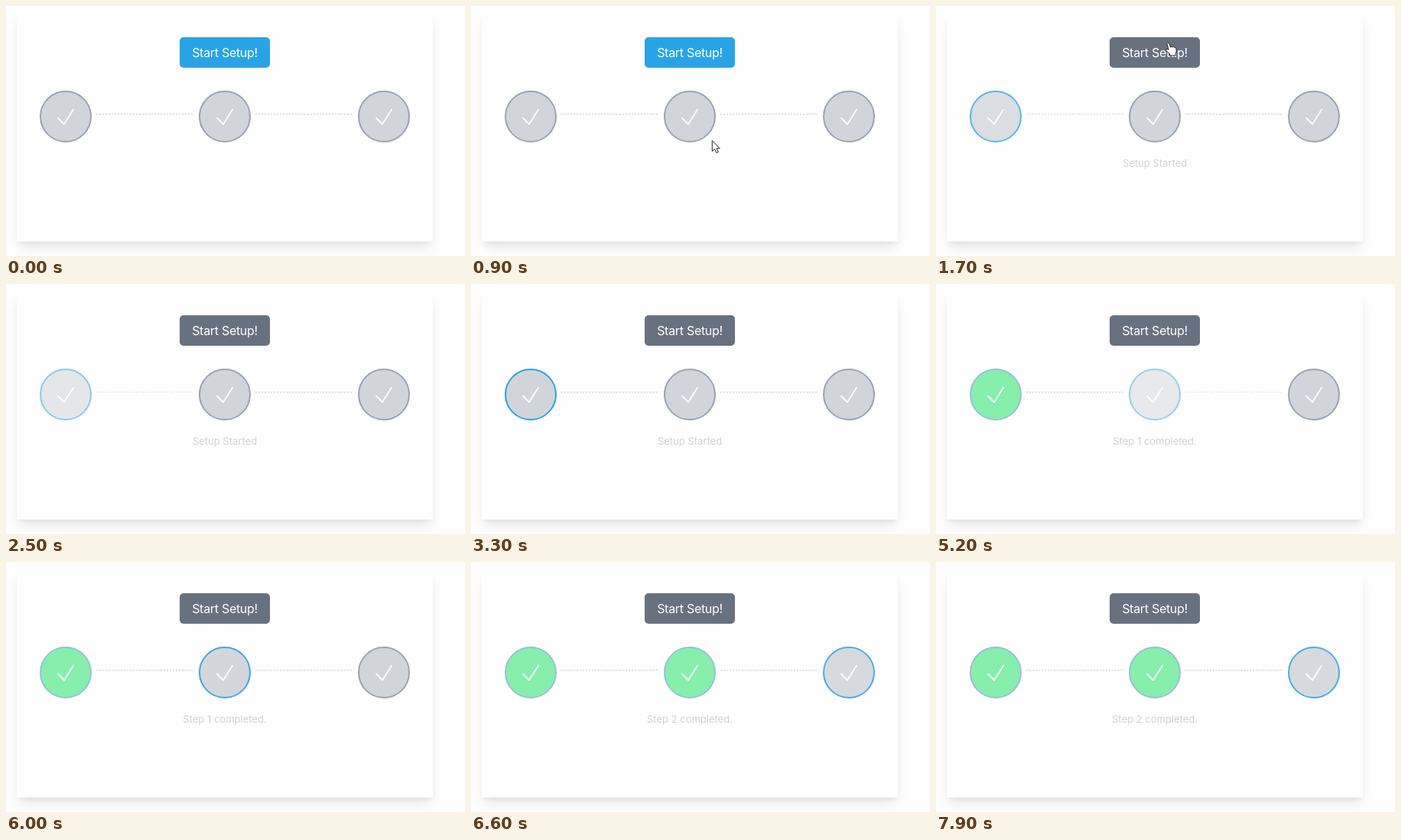
An HTML page for the animation above (8 s loop, 600 by 328 pixels).

```html
<!DOCTYPE html>
<html lang="en">
<head>
<meta charset="utf-8">
<title>Setup steps</title>
<style>
  html, body { margin: 0; width: 100%; height: 100%; overflow: hidden; background: #fefefe; }
  #card {
    position: absolute; left: 14px; top: 11px; width: 544px; height: 298px; background: #fefefe;
    box-shadow: 0 10px 15px -3px rgba(0, 0, 0, .1), 0 4px 6px -2px rgba(0, 0, 0, .05);
  }
  svg { position: absolute; left: 0; top: 0; }
  text { font-family: Inter, "Open Sans", sans-serif; text-anchor: middle; }
  .dots { stroke: #d3d5d9; stroke-width: 2; stroke-dasharray: 0 4; stroke-linecap: round; }
  .check { fill: none; stroke: #fff; stroke-width: 1.8; stroke-linecap: round; stroke-linejoin: round; }
  .pointer path { fill: #fff; stroke: #222; stroke-width: 1; stroke-linejoin: round; }
</style>
</head>
<body>
<div id="card"></div>
<svg width="600" height="328">
  <rect id="button" x="227" y="41" width="118" height="40" rx="5"/>
  <text x="286" y="67" font-size="16" letter-spacing="-.3" fill="#fff">Start Setup!</text>
  <g id="steps"></g>
  <text id="label" x="286" y="211" font-size="13" fill="#cfd2d7"></text>
  <g id="arrow" class="pointer"><path d="M0 0V14L3.3 11L5.6 16L8 15L5.8 10.200H10Z"/></g>
  <g id="hand" class="pointer"><path d="M0 1.500Q1-.8 2.800 1L4.500 6Q6 4.500 7.200 6Q8.600 4.800 9.600 6.300Q11.400 5.600 12 8Q12.800 12 11 14.500V17H4.500Q3.500 14-1.500 10Q-1.500 8 0.500 8.500L2 9.500Z"/></g>
</svg>
<script>
const LOOP = 8000, FRAME = 100;
const STARTS = [1250, 4250, 6250, Infinity];   // when each step becomes active
const LABELS = ['', 'Setup Started', 'Step 1 completed.', 'Step 2 completed.'];
const MOVE = { from: 700, to: 1200, leave: 2250, x0: 322, y0: 242, x1: 302, y1: 48 };
const $ = id => document.getElementById(id);

$('steps').innerHTML = [78, 286, 494].map((x, i) => `<g>
  <circle cx="${x}" cy="145" r="33" stroke-width="2"/>
  <path class="check" d="M${x - 10} 147l8 8l12-19"/>
  ${i < 2 ? `<path class="dots" d="M${x + 41} 142h127"/>` : ''}</g>`).join('');
const steps = [...$('steps').children];

// cubic-bezier(.4, 0, .6, 1)
function ease(x) {
  let u = x;
  for (let i = 0; i < 12; i++) u = (x + .6 * u * u - .4 * u ** 3) / 1.2;
  return u * u * (3 - 2 * u);
}

// Opacity falls from 1 to .5 and back every two seconds
function pulse(age) {
  const phase = age / 1000 % 2;
  return 1 - .5 * ease(phase < 1 ? phase : 2 - phase);
}

function place(el, shown, x, y) {
  el.setAttribute('visibility', shown ? 'visible' : 'hidden');
  el.setAttribute('transform', `translate(${x} ${y})`);
}

function draw(t) {
  steps.forEach((step, i) => {
    const done = t >= STARTS[i + 1], active = t >= STARTS[i] && !done;
    const circle = step.firstElementChild;
    circle.setAttribute('fill', done ? '#86efac' : '#d1d5db');
    circle.setAttribute('stroke', done ? '#98c0d8' : active ? '#2ea3dd' : '#9ca3af');
    step.setAttribute('opacity', active ? pulse(t - STARTS[i]) : 1);
  });
  $('button').setAttribute('fill', t < STARTS[0] ? '#28a4e6' : '#687180');
  $('label').textContent = LABELS[STARTS.filter(s => t >= s).length];

  const p = ease(Math.min(1, Math.max(0, (t - MOVE.from) / (MOVE.to - MOVE.from))));
  const x = MOVE.x0 + (MOVE.x1 - MOVE.x0) * p, y = MOVE.y0 + (MOVE.y1 - MOVE.y0) * p;
  const shown = t >= MOVE.from && t < MOVE.leave, over = y < 81;
  place($('arrow'), shown && !over, x, y);
  place($('hand'), shown && over, x, y);
}

function tick() {
  draw(Math.floor(performance.now() % LOOP / FRAME) * FRAME);
  requestAnimationFrame(tick);
}
tick();
</script>
</body>
</html>
```
